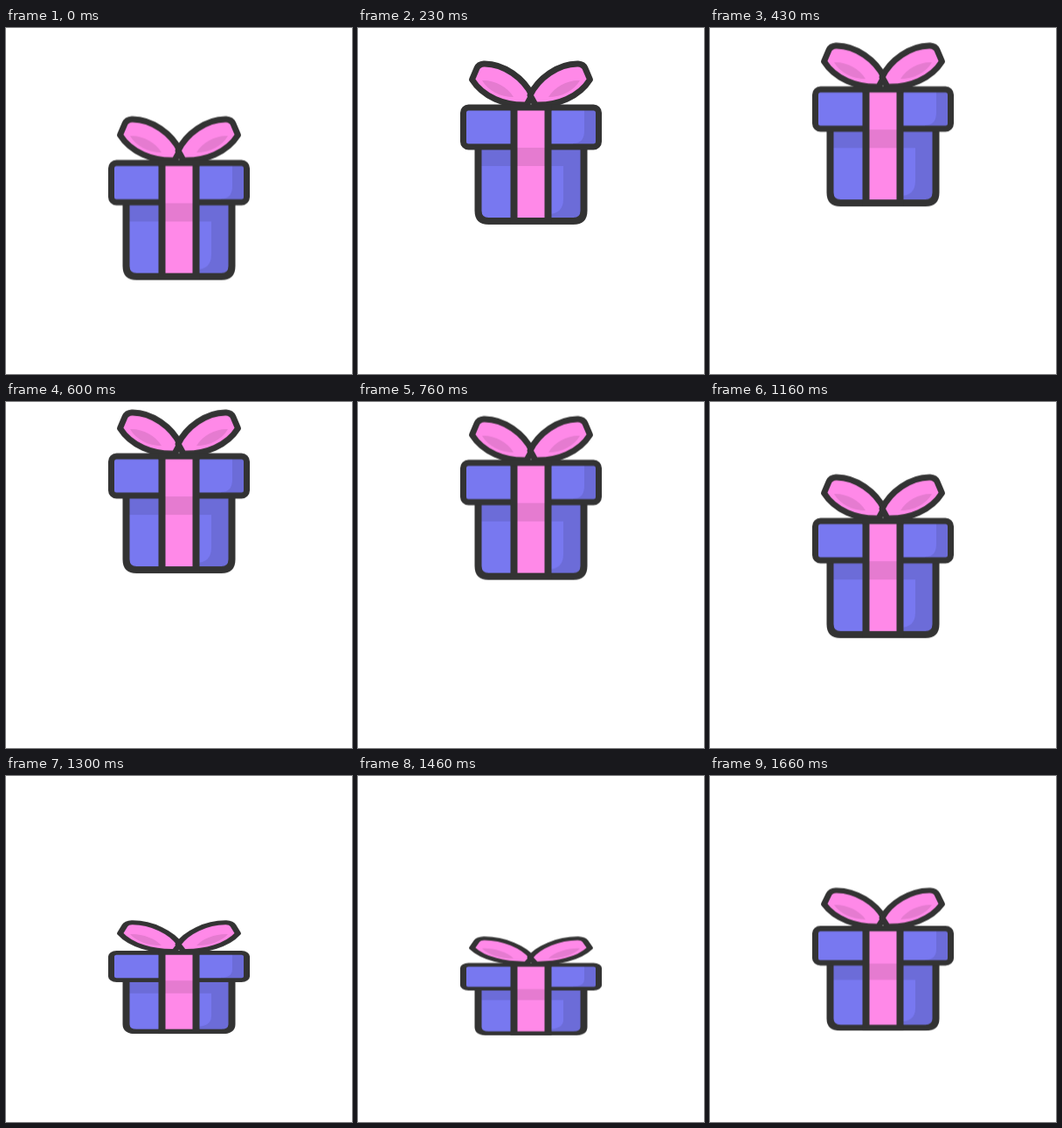
Recreate the animation shown at these times as an HTML page. Size 396 by 396 pixels, loop 1.69 s.

```html
<!DOCTYPE html>
<html lang="en">
<head>
<meta charset="utf-8">
<title>Jumping gift</title>
<style>
  html, body { margin: 0; width: 100%; height: 100%; overflow: hidden; background: #fff; }
  svg { display: block; width: 100%; height: 100%; }

  .line { fill: none; stroke: #333; stroke-width: 7; stroke-linejoin: round; }
  .thick { stroke-width: 8; }
  .blue { fill: #7878f0; }
  .blue-shade { fill: #6c6cd8; }
  .pink { fill: #ff89e8; }
  .pink-shade { fill: #e57bd0; }

  /* Anchored on the ground line, so the squash presses downwards */
  #gift { transform-origin: 198px 289px; animation: jump 1690ms infinite; }

  @keyframes jump {
    0% {
      transform: translateY(0) scaleY(1);
      animation-timing-function: cubic-bezier(.2, .69, .6, .92);
    }
    35.8% {
      transform: translateY(-93px) scaleY(1);
      animation-timing-function: cubic-bezier(.4, .08, .8, .35);
    }
    71.3% {
      transform: translateY(0) scaleY(1);
      animation-timing-function: cubic-bezier(.333, 1, .667, 1);
    }
    85.8% {
      transform: translateY(8px) scaleY(.604);
      animation-timing-function: cubic-bezier(.333, 0, .667, 0);
    }
    100% { transform: translateY(0) scaleY(1); }
  }
</style>
</head>
<body>
<svg viewBox="0 0 396 396">
  <defs>
    <g id="loop">
      <path class="pink" d="M130.5 123L136 110Q138 105.5 144 105C167 104.5 190 122 199 141L193 152C168 153 143 143 130.5 123Z"/>
      <path class="pink-shade" d="M142 124C155 123 171 131 178 143C163 143 149 136 142 124Z"/>
      <path class="line" d="M130.5 123L136 110Q138 105.5 144 105C167 104.5 190 122 199 141L193 152C168 153 143 143 130.5 123Z"/>
    </g>
  </defs>

  <g id="gift">
    <use href="#loop"/>
    <use href="#loop" transform="matrix(-1 0 0 1 396 0)"/>

    <!-- box -->
    <path class="blue" d="M137.5 200H258.5V273Q258.5 285 246.5 285H149.5Q137.5 285 137.5 273Z"/>
    <path class="blue-shade" d="M137.5 200H258.5V273Q258.5 285 246.5 285H217V277Q235 277 235 260V222H137.5Z"/>
    <path class="line thick" d="M137.5 200V273Q137.5 285 149.5 285H246.5Q258.5 285 258.5 273V200"/>

    <!-- lid -->
    <rect class="blue" x="120.5" y="155" width="155" height="45" rx="6"/>
    <path class="blue-shade" d="M259 155H269.5Q275.5 155 275.5 161V194Q275.5 200 269.5 200H246V196Q259 196 259 182Z"/>
    <rect class="line" x="120.5" y="155" width="155" height="45" rx="6"/>

    <!-- ribbon -->
    <path class="pink" d="M178.5 155H217.5V285H178.5Z"/>
    <path class="pink-shade" d="M178.5 201H217.5V222H178.5Z"/>
    <path class="line thick" d="M178.5 155V285M217.5 155V285"/>
    <path class="line" d="M174.5 155H221.5"/>
    <path class="line thick" d="M174.5 285H221.5"/>
  </g>
</svg>
</body>
</html>
```
